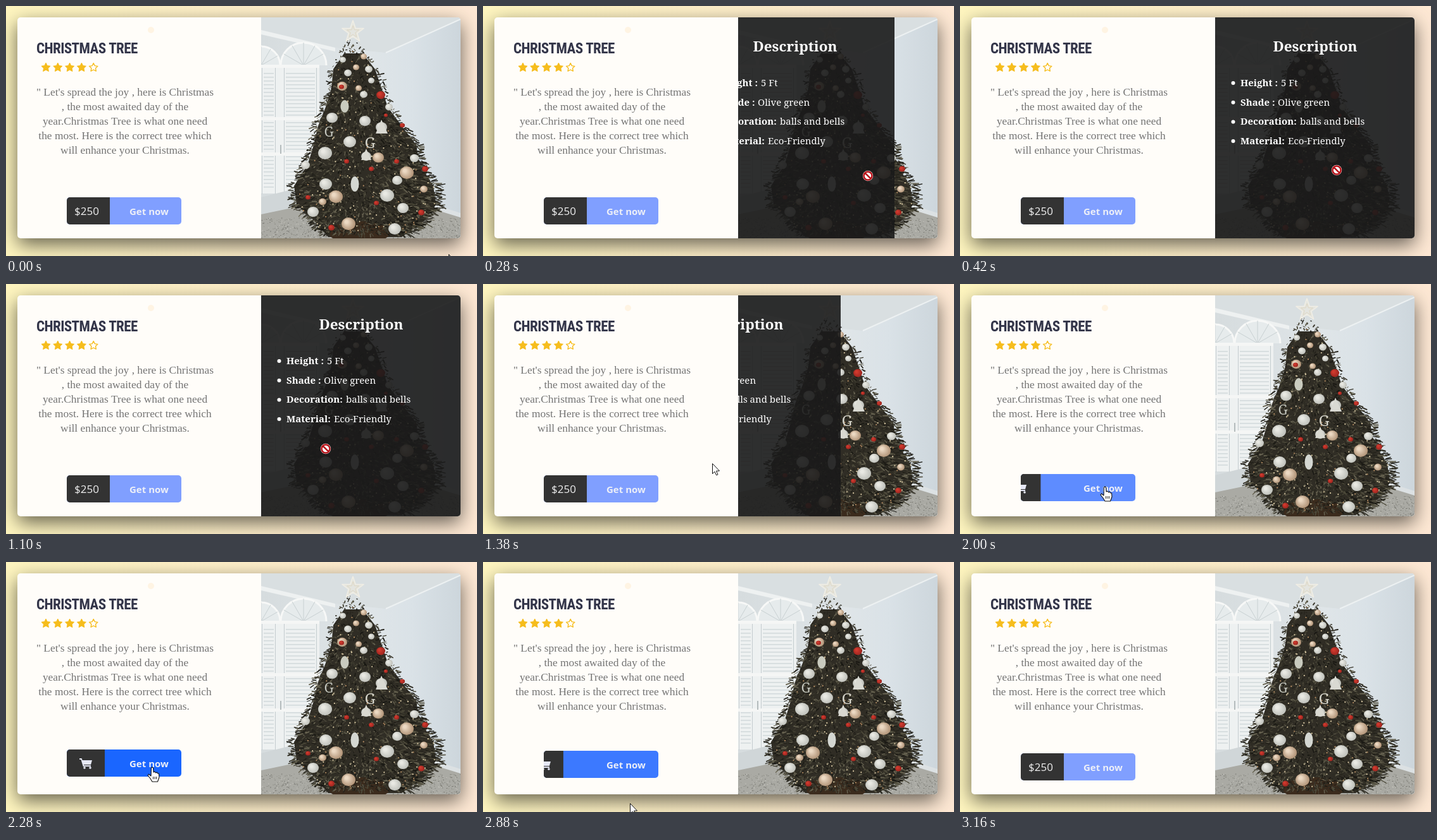
An HTML page with a canvas that plays this animation: 744x396 px, repeating every 3.29 s.

```html
<!DOCTYPE html>
<html lang="en">
<head>
<meta charset="utf-8">
<title>Christmas tree card</title>
<style>
  html, body { margin: 0; width: 100%; height: 100%; overflow: hidden; }
  canvas { display: block; width: 744px; height: 396px; }
</style>
</head>
<body>
<canvas id="stage" width="744" height="396"></canvas>
<script>
const W = 744, H = 396, LOOP = 3290, STEP = 70;
const CARD = { x: 18, y: 18, w: 700, h: 350 };
const PHOTO = { x: 403, y: 18, w: 315, h: 350 };
const BUTTON = { x: 96, y: 303, w: 181, h: 43 };
const SANS = '"Open Sans", "Noto Sans", sans-serif';
const SERIF = '"Liberation Serif", "Noto Serif", serif';
const SLAB = '"Noto Serif", "DejaVu Serif", serif';
const NARROW = '"Roboto Condensed", "Open Sans Condensed", "Noto Sans", sans-serif';

const stage = document.getElementById('stage').getContext('2d');

// ---------- helpers ----------
const lerp = (a, b, p) => a + (b - a) * p;
const clamp = p => Math.min(1, Math.max(0, p));
const ramp = (t, start, length) => clamp((t - start) / length);

// cubic-bezier(.25, .1, .25, 1)
function ease(x) {
  const at = (s, a, b) => 3 * s * (1 - s) ** 2 * a + 3 * s * s * (1 - s) * b + s ** 3;
  let lo = 0, hi = 1;
  for (let i = 0; i < 24; i++) {
    const mid = (lo + hi) / 2;
    if (at(mid, .25, .25) < x) lo = mid; else hi = mid;
  }
  return at(lo, .1, 1);
}

function randomizer(seed) {
  return () => {
    seed = (seed + 0x6D2B79F5) | 0;
    let r = Math.imul(seed ^ (seed >>> 15), 1 | seed);
    r = (r + Math.imul(r ^ (r >>> 7), 61 | r)) ^ r;
    return ((r ^ (r >>> 14)) >>> 0) / 4294967296;
  };
}

// values of a table [key, a, b, ...] at a key
function sample(table, key) {
  let i = 1;
  while (i < table.length - 1 && table[i][0] < key) i++;
  const a = table[i - 1], b = table[i], p = clamp((key - a[0]) / (b[0] - a[0]));
  return a.slice(1).map((v, k) => lerp(v, b[k + 1], p));
}

function poly(g, points, fill, stroke, width = 1, open = false) {
  g.beginPath();
  points.forEach(([x, y]) => g.lineTo(x, y));
  if (!open) g.closePath();
  if (fill) { g.fillStyle = fill; g.fill(); }
  if (stroke) { g.strokeStyle = stroke; g.lineWidth = width; g.stroke(); }
}

function oval(g, x, y, rx, ry, fill) {
  g.beginPath();
  g.ellipse(x, y, rx, ry, 0, 0, 7);
  g.fillStyle = fill;
  g.fill();
}

function star(g, x, y, r, inner, fill, stroke, width) {
  const points = Array.from({ length: 10 }, (_, i) => {
    const a = -Math.PI / 2 + i * Math.PI / 5, d = i % 2 ? r * inner : r;
    return [x + d * Math.cos(a), y + d * Math.sin(a)];
  });
  g.lineJoin = 'round';
  poly(g, points, fill, stroke, width);
}

function text(g, str, x, y, font, color, align = 'left') {
  g.font = font;
  g.fillStyle = color;
  g.textAlign = align;
  g.fillText(str, x, y);
}

function box(g, { x, y, w, h }, r) {
  g.beginPath();
  g.roundRect(x, y, w, h, r);
}

// ---------- photo ----------
const TREE = [
  [46, 545, 551], [75, 527, 570], [100, 510, 590], [130, 507, 600], [160, 498, 610],
  [190, 486, 632], [220, 479, 655], [250, 470, 660], [285, 448, 682],
  [315, 452, 686], [340, 480, 668], [366, 502, 632]
];
const PALE = [
  [540, 106, 6], [573, 100, 6], [565, 140, 6], [605, 160, 6], [567, 182, 9], [515, 177, 9],
  [543, 215, 10], [593, 192, 9], [504, 233, 11], [569, 238, 8], [505, 282, 10], [602, 300, 11],
  [618, 276, 8], [614, 353, 10], [627, 320, 9], [485, 326, 9], [473, 252, 7], [532, 85, 5],
  [645, 241, 7], [577, 118, 5]
];
const GOLD = [
  [531, 127, 8], [588, 240, 9], [521, 302, 11], [541, 345, 11], [633, 264, 11],
  [565, 80, 5], [553, 97, 5], [557, 130, 5], [500, 310, 6], [660, 290, 6]
];
const RED = [
  [592, 141, 7], [538, 246, 4], [577, 258, 4], [617, 246, 4], [662, 258, 5], [477, 303, 4],
  [514, 351, 5], [656, 327, 5], [626, 189, 4], [585, 312, 4], [530, 128, 4], [600, 173, 3]
];

function drawRoom(g, rand) {
  const wall = g.createLinearGradient(403, 0, 718, 0);
  wall.addColorStop(0, '#d6dcde');
  wall.addColorStop(.55, '#dfe5e8');
  wall.addColorStop(.75, '#dae2e7');
  wall.addColorStop(1, '#cdd6dc');
  g.fillStyle = wall;
  g.fillRect(403, 18, 315, 350);
  poly(g, [[403, 18], [718, 18], [718, 21], [600, 74], [520, 66], [403, 38]], '#d9dfe1');
  poly(g, [[403, 38], [520, 66], [520, 72], [403, 45]], '#eef1f1');
  poly(g, [[718, 21], [600, 74]], null, '#edf1f2', 2, true);

  // arched window and louvred doors
  g.fillStyle = '#eef1f1';
  g.fillRect(403, 92, 92, 205);
  for (const [x, r] of [[403, 30], [470, 36]]) {
    g.beginPath();
    g.arc(x, 94, r, Math.PI, 0);
    g.fillStyle = '#e6ebec';
    g.fill();
    g.strokeStyle = '#f7f8f7';
    g.lineWidth = 3;
    g.stroke();
    for (let i = 1; i < 6; i++) {
      const a = Math.PI * (1 + i / 6);
      poly(g, [[x, 94], [x + r * Math.cos(a), 94 + r * Math.sin(a)]], null, '#c8d0d2', 1, true);
    }
  }
  for (let y = 106; y < 290; y += 6) {
    g.fillStyle = '#d2d9db';
    g.fillRect(407, y, 16, 1.5);
    g.fillRect(442, y, 46, 1.5);
  }
  for (const x of [404, 425, 439, 490]) {
    g.fillStyle = '#c4cccf';
    g.fillRect(x, 94, 1, 204);
  }
  g.fillStyle = '#f5f6f5';
  for (const y of [93, 176, 232]) g.fillRect(403, y, 92, 5);
  g.fillStyle = '#b5bcbd';
  g.fillRect(433, 220, 2, 14);

  // speckled floor
  poly(g, [[403, 303], [470, 286], [470, 320], [403, 330]], '#d0d6d8');
  poly(g, [[403, 330], [470, 316], [650, 312], [718, 334], [718, 368], [403, 368]], '#aaaaa4');
  poly(g, [[650, 306], [718, 328], [718, 335], [650, 314]], '#dce1e3');
  for (let i = 0; i < 900; i++) {
    const x = 403 + 315 * rand(), y = 335 + 33 * rand();
    g.fillStyle = ['#85857e', '#c6c5be', '#97978f', '#6f6f69'][i % 4];
    g.fillRect(x, y, 1.5, 1);
  }
}

function drawTree(g, rand) {
  const inset = 7;
  const left = TREE.map(([y, l]) => [l + inset, y]);
  const right = TREE.map(([y, , r]) => [r - inset, y]).reverse();
  poly(g, left.slice(1).concat(right.slice(0, -1)), '#302d25');
  oval(g, 558, 359, 48, 18, '#3b2b1d');

  const tones = ['#24221b', '#3a372c', '#4d4a3a', '#191813', '#666250', '#2d2b22'];
  g.lineCap = 'round';
  for (let i = 0; i < 3600; i++) {
    const y = 50 + 312 * Math.sqrt(rand());
    const [l, r] = sample(TREE, y);
    const x = lerp(l, r, rand()), side = (x - 554) / 110;
    const reach = 4 + 7 * rand();
    poly(g, [[x, y], [x + side * reach + (rand() - .5) * 5, y + (rand() - .35) * reach]],
      null, tones[i % tones.length], .8 + rand() * 1.2, true);
  }
  for (let i = 0; i < 170; i++) {
    const y = 60 + 300 * Math.sqrt(rand()), [l, r] = sample(TREE, y);
    oval(g, lerp(l + 5, r - 5, rand()), y, 1.1, 1.1, i % 3 ? '#d9c9a3' : '#b58c62');
  }
}

function bauble(g, [x, y, r], base, shade) {
  const glow = g.createRadialGradient(x - r * .3, y - r * .3, r * .2, x, y, r * 1.1);
  glow.addColorStop(0, base);
  glow.addColorStop(1, shade);
  oval(g, x, y, r, r * .9, glow);
}

function drawPhoto(g) {
  const rand = randomizer(25);
  g.save();
  box(g, PHOTO, [0, 5, 5, 0]);
  g.clip();
  drawRoom(g, rand);
  drawTree(g, rand);
  PALE.forEach(b => bauble(g, b, '#e9e9e3', '#b9bbb5'));
  GOLD.forEach(b => bauble(g, b, '#ecd9c3', '#a98a6d'));
  RED.forEach(b => bauble(g, b, '#d03a2e', '#96221d'));
  oval(g, 535, 159, 6.5, 10, '#c9cbbf');
  oval(g, 551, 282, 6.5, 12, '#d4d7d2');
  poly(g, [[593, 180], [603, 202], [584, 202]], '#d9d9d2');
  poly(g, [[569, 226], [577, 244], [561, 244]], '#d9d8d0');
  text(g, 'G', 575, 225, `24px ${SLAB}`, '#d3d2c8', 'center');
  text(g, 'G', 510, 207, `21px ${SLAB}`, '#c3c5bd', 'center');
  star(g, 548, 41, 18, .4, 'rgba(240,236,224,.5)', '#f1eee4', 1.5);
  star(g, 548, 41, 10, .4, null, '#e0d8c2', 1);
  g.restore();
}

// ---------- still layer ----------
function drawTitle(g) {
  const title = 'CHRISTMAS TREE', room = 161;
  let size = 28;
  g.save();
  g.fontStretch = 'extra-condensed';
  g.letterSpacing = '-0.6px';
  do g.font = `bold ${size}px ${NARROW}`;
  while (g.measureText(title).width > room && (size -= .5) > 12);
  text(g, title, 48, 67 + size * .36, g.font, '#34364a');
  g.restore();
}

function drawStill(g) {
  const sky = g.createLinearGradient(0, 0, W, 0);
  sky.addColorStop(0, '#fff6bf');
  sky.addColorStop(1, '#fee8d4');
  g.fillStyle = sky;
  g.fillRect(0, 0, W, H);

  g.save();
  g.shadowColor = 'rgba(0,0,0,.6)';
  g.shadowBlur = 30;
  g.shadowOffsetY = 10;
  g.fillStyle = '#fffdf9';
  box(g, CARD, 5);
  g.fill();
  g.restore();

  drawPhoto(g);
  oval(g, 229, 38, 5, 5, '#fff4e3');
  drawTitle(g);
  for (let i = 0; i < 5; i++) {
    const x = 63 + i * 18.8;
    if (i < 4) star(g, x, 97.5, 7.4, .5, '#f6bd1d', '#f6bd1d', 1);
    else star(g, x, 97.5, 7, .5, null, '#f6bd1d', 1.4);
  }
  [
    '" Let\'s spread the joy , here is Christmas',
    ', the most awaited day of the',
    'year.Christmas Tree is what one need',
    'the most. Here is the correct tree which',
    'will enhance your Christmas.'
  ].forEach((line, i) => text(g, line, 188, 142 + i * 23, `17.4px ${SERIF}`, '#747474', 'center'));
}

// ---------- moving parts ----------
function drawPanel(g, open) {
  if (open <= 0) return;
  g.save();
  box(g, PHOTO, [0, 5, 5, 0]);
  g.clip();
  g.translate(Math.round((open - 1) * PHOTO.w), 0);
  g.fillStyle = 'rgba(26,26,26,.9)';
  g.fillRect(PHOTO.x, PHOTO.y, PHOTO.w, PHOTO.h);
  text(g, 'Description', 561, 72, `bold 22.5px ${SLAB}`, '#fff', 'center');
  [
    ['Height :', '5 Ft', 507],
    ['Shade :', 'Olive green', 502],
    ['Decoration:', 'balls and bells', 537],
    ['Material:', 'Eco-Friendly', 518]
  ].forEach(([label, value, x], i) => {
    const y = 127 + i * 30.7;
    oval(g, 431.5, y - 5, 3, 3, '#fff');
    text(g, label, 443, y, `bold 15px ${SLAB}`, '#fff');
    text(g, value, x, y, `500 15px ${SLAB}`, '#fff');
  });
  g.restore();
}

function drawCart(g, x, y) {
  const ink = '#e6e8f6';
  g.save();
  g.translate(x, y);
  poly(g, [[-10, -7], [-7, -7], [-3.5, 4], [8, 4]], null, ink, 1.8, true);
  poly(g, [[-6, -5], [10, -5], [8, 2], [-4, 2]], ink);
  oval(g, -2, 7, 1.8, 1.8, ink);
  oval(g, 7, 7, 1.8, 1.8, ink);
  g.restore();
}

function drawButton(g, lift, slide) {
  const { x, y } = BUTTON, priceWidth = 75.5, cartWidth = 60;
  const shift = -slide * priceWidth, cartLeft = x - cartWidth * (1 - slide);
  g.save();
  g.translate(0, -Math.round(6 * lift));
  box(g, BUTTON, 5);
  g.clip();
  g.fillStyle = `rgb(${lerp(128, 26, lift)},${lerp(159, 102, lift)},255)`;
  g.fillRect(x, y, BUTTON.w, BUTTON.h);
  g.fillStyle = '#333';
  g.fillRect(164 - priceWidth + shift, y, priceWidth, BUTTON.h);
  text(g, '$250', 108 + shift, 331, `17px ${SANS}`, '#eee');
  g.fillStyle = '#333';
  g.fillRect(cartLeft, y, cartWidth, BUTTON.h);
  drawCart(g, cartLeft + cartWidth / 2, y + 22);
  text(g, 'Get now', 195, 331, `bold 15px ${SANS}`, '#eceff8');
  g.restore();
}

const CURSOR_PATH = [
  [0, 699, 393], [70, 688, 376], [140, 662, 336], [210, 630, 295], [280, 608, 269],
  [350, 598, 262], [420, 595, 260], [750, 595, 260], [820, 588, 260], [1100, 505, 261],
  [1240, 424, 266], [1310, 384, 278], [1380, 362, 284], [1520, 338, 289], [1860, 292, 311],
  [1930, 258, 320], [2000, 229, 321], [2280, 231, 325], [2670, 231, 325],
  [2740, 232, 335], [2810, 232, 356], [2880, 232, 382], [2950, 233, 412], [LOOP, 233, 412]
];
const inside = (x, y, r) => x > r.x && x < r.x + r.w && y > r.y && y < r.y + r.h;

function drawCursor(g, t) {
  const [x, y] = sample(CURSOR_PATH, t);
  g.save();
  g.translate(x, y);
  g.lineJoin = 'round';
  if (inside(x, y, PHOTO)) {
    oval(g, 0, 0, 8.2, 8.2, '#fff');
    g.beginPath();
    g.arc(0, 0, 6.5, 0, 7);
    g.moveTo(-4.4, -4.4);
    g.lineTo(4.4, 4.4);
    g.strokeStyle = '#b8141b';
    g.lineWidth = 2.6;
    g.stroke();
  } else if (inside(x, y, BUTTON)) {
    poly(g, [[-1.5, 1], [0, 0], [1.5, 1], [2, 8], [4, 7], [5.5, 9], [7.5, 8], [8.5, 10], [10.5, 10],
      [11, 16], [8.5, 23], [0, 23], [-3, 18], [-7, 13], [-5.5, 11], [-2, 14]], '#fff', '#111', 1.1);
    for (const dx of [1.5, 4, 6.5]) poly(g, [[dx, 15], [dx, 19]], null, '#111', .9, true);
  } else {
    poly(g, [[.5, .5], [.5, 16.5], [4, 13.2], [6.6, 18.8], [9, 17.8], [6.5, 12.2], [11.5, 12]],
      '#fff', '#111', 1);
  }
  g.restore();
}

// ---------- timeline ----------
const RUNS = [[0, 420], [820, 1730], [1860, 2280], [2740, 3160]];

// the picture advances in steps and rests between the runs
function stepped(t) {
  const [start, end] = RUNS.filter(run => run[0] <= t).pop();
  return Math.min(end, start + Math.floor((t - start) / STEP) * STEP);
}

const still = document.createElement('canvas');
still.width = W;
still.height = H;
drawStill(still.getContext('2d'));

function render(time) {
  const t = stepped(time);
  const open = ease(ramp(t, 135, 300)) - ease(ramp(t, 1260, 420));
  const lift = ramp(t, 1900, 300) - ramp(t, 2780, 300);
  const slide = ease(ramp(t, 1900, 350)) - ease(ramp(t, 2780, 350));
  stage.drawImage(still, 0, 0);
  drawPanel(stage, open);
  drawButton(stage, lift, slide);
  drawCursor(stage, t);
}

const began = performance.now();
function tick() {
  render((performance.now() - began) % LOOP);
  requestAnimationFrame(tick);
}
tick();
</script>
</body>
</html>
```
